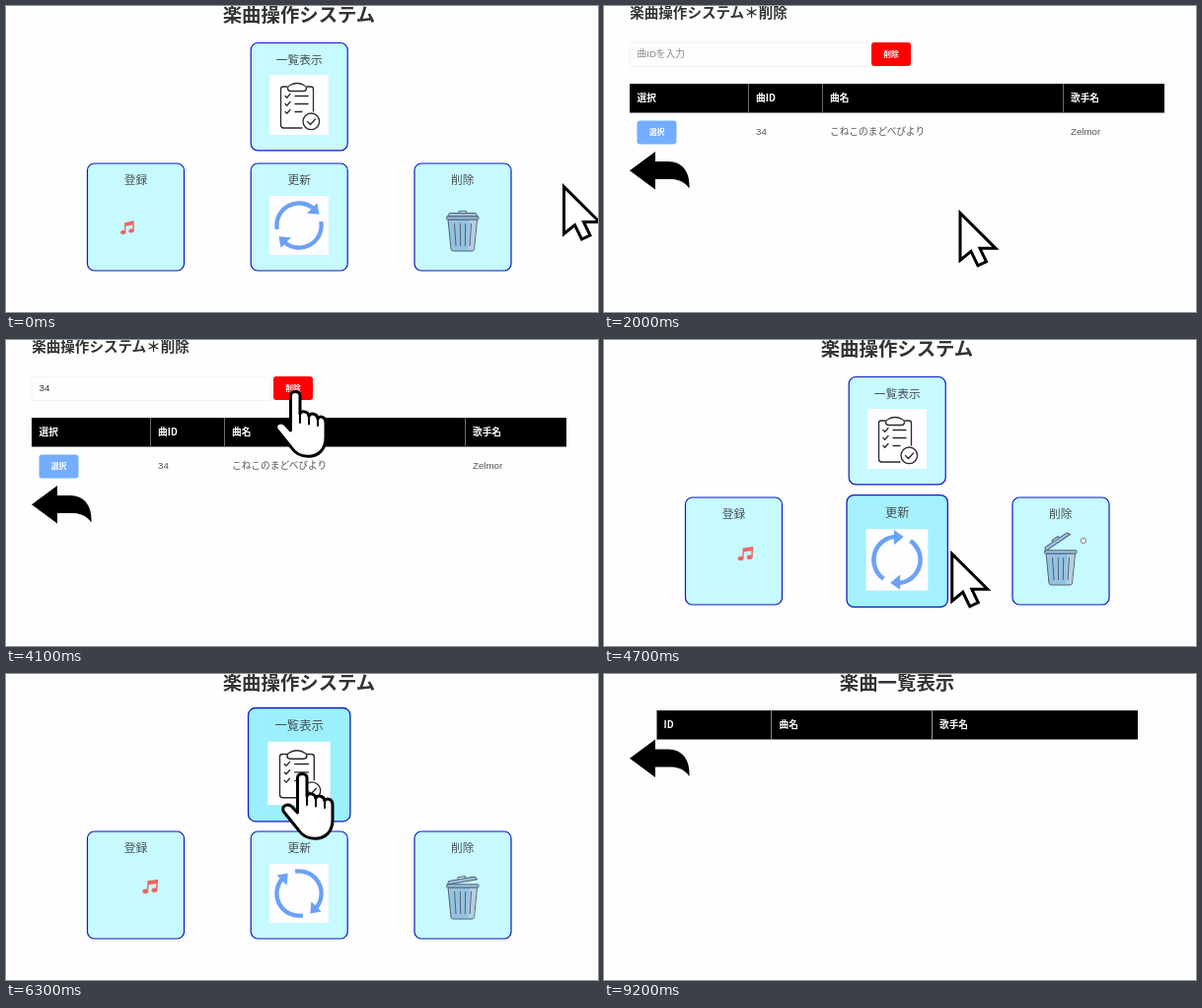
These frames come from a looping animation (600 px wide and 311 px high, 9300 ms). An HTML page:

```html
<!DOCTYPE html>
<html lang="ja">
<head>
<meta charset="utf-8">
<style>
html, body { margin: 0; width: 100%; height: 100%; overflow: hidden; background: #fefdff; }
svg { display: block; width: 600px; height: 311px; }
text { font-family: "Noto Sans CJK JP", "Noto Sans CJK", sans-serif; fill: #333; }
.title { font-size: 19.4px; font-weight: 700; text-anchor: middle; }
.label { font-size: 11.7px; font-weight: 300; text-anchor: middle; fill: #4a5054; }
.head { font-size: 9.7px; font-weight: 700; fill: #fff; }
.cell { font-family: "Liberation Sans", "Noto Sans CJK JP", "Noto Sans CJK", sans-serif; font-size: 9.7px; font-weight: 300; fill: #555; }
.btn { font-size: 7.8px; font-weight: 700; fill: #fff; text-anchor: middle; }
#field { fill: #333; }
#field.hint { fill: #888; }
.card rect.bg { fill: #c6faff; stroke: #0a1cc4; stroke-width: 1.2; }
.line { fill: none; stroke: #2a2a2e; stroke-width: 1.3; stroke-linecap: round; stroke-linejoin: round; }
.can { fill: #92c3e2; stroke: #5a6070; stroke-width: 1; stroke-linejoin: round; }
.pointer { fill: #fff; stroke: #000; stroke-width: 3; }
</style>
</head>
<body>
<svg viewBox="0 0 600 311">
  <defs>
    <path id="back" d="M26 167.300L52 148V158H65C80 158 87.500 169.500 86.500 185.500C81 177.500 74 176 66 176H52V186.500Z"/>
    <g id="swoosh">
      <path d="M-18.500 -13A22.600 22.600 0 0 1 22.500 -2" fill="none" stroke="#6ba1f6" stroke-width="4.300"/>
      <path d="M14.500 -3H29L22.500 6.500Z" fill="#6ba1f6"/>
    </g>
  </defs>

  <g id="menu">
    <text class="title" x="297" y="15.500">楽曲操作システム</text>
    <g class="card">
      <rect class="bg" x="248.200" y="37.500" width="98" height="109.300" rx="7"/>
      <text class="label" x="297.200" y="58.700">一覧表示</text>
      <rect x="267" y="70" width="60" height="61" fill="#fefdff"/>
      <g class="line">
        <path d="M285 82H281Q278.500 82 278.500 84.500V121Q278.500 124 281.500 124H300M305 82H309Q311.500 82 311.500 84.500V107"/>
        <path d="M285.500 83.500Q285.500 81.500 288 80.500Q291 78.500 295 78.500T302 80.500Q304.500 81.500 304.500 83.500Q304.500 86.500 301.500 86.500H288.500Q285.500 86.500 285.500 83.500Z"/>
        <path d="M283 91.500l1.700 1.700 3.300-3.700M283 99.500l1.700 1.700 3.300-3.700M283 107.500l1.700 1.700 3.300-3.700M293 91.500H306M293 99.500H306M293 107.500H300"/>
        <circle cx="309.300" cy="117.300" r="8.300"/>
        <path d="M305.500 117.500l3 3 5-5.500"/>
      </g>
    </g>
    <g class="card">
      <rect class="bg" x="82.500" y="160" width="98" height="109" rx="7"/>
      <text class="label" x="131.500" y="181">登録</text>
      <g id="note" fill="#f06461">
        <ellipse cx="-4.500" cy="4.800" rx="2.700" ry="2.100"/>
        <ellipse cx="3.700" cy="3.200" rx="2.700" ry="2.100"/>
        <path d="M-3.200 5V-5L6.400 -7V3.200H5V-3L-1.900 -1.500V5Z"/>
      </g>
    </g>
    <g class="card">
      <rect class="bg" x="248.200" y="160" width="98" height="109" rx="7"/>
      <text class="label" x="297.200" y="181">更新</text>
      <rect x="267" y="193" width="60" height="60" fill="#fefdff"/>
      <g id="spin"><use href="#swoosh"/><use href="#swoosh" transform="rotate(180)"/></g>
    </g>
    <g class="card">
      <rect class="bg" x="414" y="160" width="98" height="109" rx="7"/>
      <text class="label" x="462.700" y="181">削除</text>
      <circle id="paper" r="2.700" fill="#f3eef2" stroke="#776f78" stroke-width=".8"/>
      <path class="can" d="M448 217H477.500L474.500 247Q474.300 249 472 249H453.500Q451.200 249 451 247Z"/>
      <path d="M470 217.600H476.800L474 248H468Z" fill="#b3cfe0"/>
      <path d="M454.500 221L456 244M460.300 221L460.700 244M465.700 221L465.300 244M471.500 221L470 244" stroke="#5a6070" stroke-width="1"/>
      <rect class="can" x="446.500" y="213.800" width="32.500" height="3.200" rx="1"/>
      <g id="lid">
        <path class="can" d="M459 210.500V208.500H466.500V210.500" style="fill:none"/>
        <path class="can" d="M447.500 213.800L449.500 210.500H476L478 213.800Z"/>
      </g>
    </g>
  </g>

  <g id="remove">
    <text class="title" x="106" y="12" style="font-size:14.550px">楽曲操作システム＊削除</text>
    <rect x="26" y="37" width="242" height="24.500" rx="2" fill="none" stroke="#f4f1f6"/>
    <text id="field" class="cell" x="33.500" y="52"></text>
    <rect x="271" y="37" width="40" height="24" rx="3" fill="#f00"/>
    <text class="btn" x="291" y="51.800">削除</text>
    <rect x="26" y="79" width="542" height="29.500"/>
    <path d="M146.500 79V108.500M221.500 79V108.500M465.500 79V108.500" stroke="#777" stroke-width=".9"/>
    <text class="head" x="33.500" y="97.200">選択</text>
    <text class="head" x="154" y="97.200">曲ID</text>
    <text class="head" x="229" y="97.200">曲名</text>
    <text class="head" x="473" y="97.200">歌手名</text>
    <rect x="33.500" y="116.500" width="40" height="24" rx="3" fill="#74adff"/>
    <text class="btn" x="53.500" y="131.300">選択</text>
    <text class="cell" x="154" y="131.300">34</text>
    <text class="cell" x="229" y="131.300">こねこのまどべびより</text>
    <text class="cell" x="473" y="131.300">Zelmor</text>
    <use href="#back"/>
  </g>

  <g id="list">
    <text class="title" x="297" y="15.500">楽曲一覧表示</text>
    <rect x="53.500" y="37" width="487.500" height="29.500"/>
    <path d="M169.700 37V66.500M332.500 37V66.500" stroke="#aaa" stroke-width=".9"/>
    <text class="head" x="60.500" y="55">ID</text>
    <text class="head" x="177.500" y="55">曲名</text>
    <text class="head" x="340" y="55">歌手名</text>
    <use href="#back" y="-81.500"/>
  </g>

  <path id="arrow" class="pointer" d="M1.500 3.600V51.500L12.500 42.500L19.500 57L28 53L21.500 39.500H37.500Z"/>
  <g id="hand" class="pointer" stroke-linejoin="round" stroke-linecap="round">
    <path d="M-4.500 5.500C-4.500 0 5 0 5 5.500V24C6 20.500 13.500 21 14 26.500C15.500 22.500 22.500 23.500 23 29C25 25.500 31 27 31 33V48C31 60 24 67.300 13 67.300C4.500 67.300 0 64 -4 58L-18.500 40C-21.500 34 -14.500 31 -10 35L-4.500 41Z"/>
    <path d="M5 24V33M14 26.500V34.500M23 29V36" fill="none" stroke-width="2"/>
  </g>
</svg>
<script>
const LOOP = 9300;
const $ = id => document.getElementById(id);
const cards = [...document.querySelectorAll('.card')].map(el => {
  const bg = el.querySelector('.bg'), n = k => +bg.getAttribute(k);
  return { el, bg, x: n('x'), y: n('y'), w: n('width'), h: n('height') };
});

// [start, page]
const pages = [[0, 'menu'], [1100, 'remove'], [4300, 'menu'], [6450, 'list']];
// [time, x, y] of the pointer tip
const path = [
  [0, 564, 180], [100, 564, 180], [700, 482, 217], [1700, 482, 217],
  [2000, 360, 207], [2600, 53, 118], [2900, 53, 118], [3500, 293, 51],
  [4350, 293, 51], [4650, 335, 227], [5400, 574, 32], [5650, 574, 32],
  [6200, 300, 100], [6600, 300, 100], [7000, 521, 96], [7200, 550, 136]
];
const hideAt = 7600;

const clamp = v => Math.max(0, Math.min(1, v));
const ramp = (t, a, b) => clamp((t - a) / (b - a));
const mix = (a, b, k) => a + (b - a) * k;
const within = (p, x, y, w, h) => p[0] >= x && p[0] <= x + w && p[1] >= y && p[1] <= y + h;
const pageAt = t => pages.filter(p => p[0] <= t).pop();

function tip(t) {
  const i = path.findIndex(p => p[0] > t);
  if (i < 0) return path[path.length - 1].slice(1);
  const a = path[i - 1], b = path[i], k = ramp(t, a[0], b[0]);
  return [mix(a[1], b[1], k), mix(a[2], b[2], k)];
}

// Share of the last 200 ms spent over the card
function hover(c, t, start) {
  let n = 0;
  for (let i = 0; i < 10; i++) {
    const s = t - i * 20;
    if (s >= start && within(tip(s), c.x, c.y, c.w, c.h)) n++;
  }
  return n / 10;
}

function drawMenu(t, start) {
  for (const c of cards) {
    const k = hover(c, t, start), cx = c.x + c.w / 2, cy = c.y + c.h / 2;
    c.el.setAttribute('transform', `translate(${cx} ${cy}) scale(${1 + .055 * k}) translate(${-cx} ${-cy})`);
    c.bg.style.fill = `rgb(${mix(198, 156, k)},${mix(250, 239, k)},${mix(255, 253, k)})`;
  }
  const sway = (1 - Math.cos(t / 1800 * 2 * Math.PI)) / 2;
  $('note').setAttribute('transform',
    `translate(${123.3 + 23.3 * sway} ${225.3 - 9.3 * sway}) rotate(${4 * sway}) scale(${1 + .1 * sway})`);
  // Sixteen steps per turn
  $('spin').setAttribute('transform', `translate(297 223) rotate(${Math.floor(t / 75) * 22.5 - 45})`);

  const u = t % 2000;
  const open = ramp(u, 200, 550) - ramp(u, 1500, 1850);
  $('lid').setAttribute('transform', `translate(0 ${open}) rotate(${-34 * open} 447 214)`);
  const fall = ramp(u, 700, 1000);
  $('paper').setAttribute('transform', `translate(${mix(486, 463, fall)} ${204 + 14 * fall * fall})`);
  $('paper').style.opacity = fall > 0 && fall < 1 ? 1 : 0;
}

function drawPointer(t, page) {
  const p = tip(t);
  const link = page === 'menu' ? cards.some(c => within(p, c.x, c.y, c.w, c.h))
    : page === 'remove' && (within(p, 33, 116, 40, 24) || within(p, 271, 37, 40, 24));
  for (const [id, on] of [['hand', link], ['arrow', !link]]) {
    $(id).style.display = on && t < hideAt ? '' : 'none';
    $(id).setAttribute('transform', `translate(${p})`);
  }
}

function draw(t) {
  const [start, page] = pageAt(t);
  for (const id of ['menu', 'remove', 'list']) $(id).style.display = id === page ? '' : 'none';
  if (page === 'menu') drawMenu(t, start);
  const filled = t >= 2800;
  $('field').textContent = filled ? '34' : '曲IDを入力';
  $('field').classList.toggle('hint', !filled);
  drawPointer(t, page);
}

const began = performance.now();
function tick() {
  draw((performance.now() - began) % LOOP);
  requestAnimationFrame(tick);
}
tick();
</script>
</body>
</html>
```
